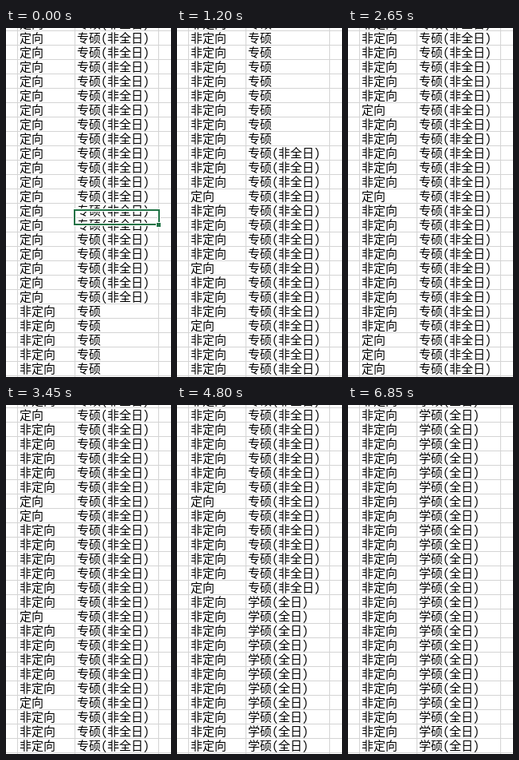
An HTML page with a canvas for the animation above (8000 ms loop, 207 by 437 pixels).

```html
<!DOCTYPE html>
<html lang="zh-CN">
<head>
<meta charset="utf-8">
<style>
html, body { margin: 0; width: 100%; height: 100%; overflow: hidden; background: #fff; }
canvas { display: block; }
</style>
</head>
<body>
<canvas id="sheet" width="207" height="437"></canvas>
<script>
const ctx = document.getElementById('sheet').getContext('2d');
const WIDTH = 207, HEIGHT = 437, ROW = 18, FIRST_LINE = 3, VISIBLE_ROWS = 24;
const LOOP = 8000, STEP = 50, LAST_STEP = 137;
const EM = 15, PAREN = 8;

// Scattered 定向 entries inside the mixed section
const directed = new Set([
  64, 69, 73, 82, 84, 88, 92, 98, 104, 107, 116, 122, 132, 133, 134,
  138, 143, 149, 150, 157, 163, 168, 174, 182, 187, 189, 190, 192, 195, 203, 209
]);

const between = (n, from, to) => n >= from && n <= to;

function enrolment(row) {
  return row < 19 || between(row, 24, 35) || directed.has(row) ? '定向' : '非定向';
}

function degree(row) {
  if (between(row, 19, 23) || between(row, 36, 60) || row === 254 || row === 276) return '专硕';
  return row < 210 ? '专硕(非全日)' : '学硕(全日)';
}

// The scroll slows from three rows per step to two
function topRow(time) {
  const step = Math.min(Math.floor(time / STEP), LAST_STEP);
  return 2 * step + Math.min(step, 5);
}

function drawText(text, x, baseline) {
  for (const char of text) {
    const advance = char === '(' || char === ')' ? PAREN : EM;
    ctx.fillText(char, x + advance / 2, baseline);
    x += advance;
  }
}

function drawGrid() {
  ctx.fillStyle = '#d4d4d4';
  for (let y = FIRST_LINE; y < HEIGHT; y += ROW) ctx.fillRect(0, y, WIDTH, 1);
  for (const x of [14, 86, 191]) ctx.fillRect(x, 0, 1, HEIGHT);
}

function drawSelection(y) {
  const frame = (color, width) => {
    ctx.strokeStyle = color;
    ctx.lineWidth = width;
    ctx.strokeRect(86, y, 106, ROW);
  };
  frame('#fff', 4);
  frame('#217346', 2);
  ctx.fillStyle = '#fff';
  ctx.fillRect(188, y + 15, 7, 7);
  ctx.fillStyle = '#217346';
  ctx.fillRect(189, y + 16, 5, 5);
}

function draw(time) {
  const top = topRow(time);
  ctx.fillStyle = '#fff';
  ctx.fillRect(0, 0, WIDTH, HEIGHT);
  drawGrid();

  ctx.font = `300 ${EM}px "Noto Sans Mono CJK SC", "Noto Sans CJK SC", "Noto Sans CJK", monospace`;
  ctx.textAlign = 'center';
  ctx.fillStyle = '#000';
  for (let i = -1; i < VISIBLE_ROWS; i++) {
    const baseline = FIRST_LINE + i * ROW + 15;
    drawText(enrolment(top + i), 17, baseline);
    drawText(degree(top + i), 89, baseline);
  }
  drawSelection(228 - top * ROW);
}

const start = performance.now();
function tick() {
  draw((performance.now() - start) % LOOP);
  requestAnimationFrame(tick);
}
tick();
</script>
</body>
</html>
```
